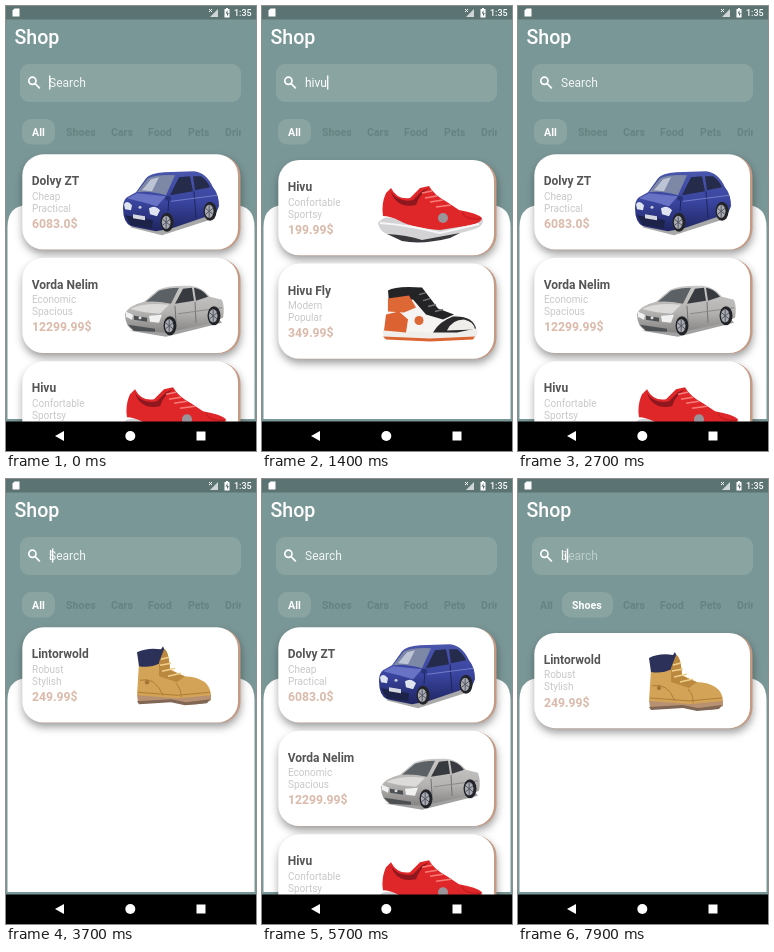
Recreate the animation shown at these times as an HTML page. Size 250 px wide and 445 px high, loop 8 s.

```html
<!DOCTYPE html>
<html lang="en">
<head>
<meta charset="utf-8">
<title>Shop search</title>
<style>
html, body { margin: 0; width: 100%; height: 100%; overflow: hidden; background: #7a9797; }
svg { display: block; width: 100%; height: 100%; }
text { font-family: Roboto, sans-serif; white-space: pre; }
.tab { font-size: 10.6px; font-weight: 700; fill: #648381; }
.name { font-size: 12px; font-weight: 700; fill: #555; }
.note { font-size: 10px; fill: #c8c8c8; }
.price { font-size: 12.2px; font-weight: 700; fill: #dabaab; }
.field { font-size: 12px; fill: #fff; }
.back { fill: #c59a84; filter: drop-shadow(0 4px 4px rgba(0, 0, 0, .4)); }
</style>
</head>
<body>
<svg viewBox="0 0 250 445">
  <defs>
    <clipPath id="listArea"><rect y="140" width="250" height="276"/></clipPath>
    <clipPath id="tabArea"><rect x="14" y="105" width="221" height="40"/></clipPath>
    <linearGradient id="bluePaint" x2="0" y2="1"><stop stop-color="#4a55ac"/><stop offset=".5" stop-color="#3a45a0"/><stop offset="1" stop-color="#1f2560"/></linearGradient>
    <linearGradient id="silverPaint" x2="0" y2="1"><stop stop-color="#c9c8c6"/><stop offset=".55" stop-color="#b5b4b2"/><stop offset="1" stop-color="#858483"/></linearGradient>
    <g id="wheel"><ellipse rx="6.500" ry="9.500" fill="#232428"/><ellipse cx="-.8" rx="4.300" ry="6.500" fill="#a9acb4"/><path d="M-.8 -6V6M-4.500 -3L3 3M-4.500 3L3 -3" stroke="#55585f"/></g>

    <g id="hatchback">
      <path d="M124 73L156 81L209 64L206 56Z" fill="#555" opacity=".5"/>
      <path d="M117 54Q117 46 121 43L130 38L140 24Q144 19 158 18L188 17Q200 18 207 33Q213 40 213 52L210 59L166 74L150 77L125 72Q117 68 117 54Z" fill="url(#bluePaint)"/>
      <path d="M121 44L131 39L160 42L151 52Q134 47 121 44Z" fill="#6873c6"/>
      <path d="M131 38L142 24Q152 20 169 21L160 41Q144 36 131 38Z" fill="#7d87a6"/>
      <path d="M136 36L145 25L153 23L146 37Z" fill="#bcc4d6"/>
      <path d="M164 41L173 23L184 22L187 37ZM189 36L187 22L195 22Q201 26 204 33Z" fill="#252b4a"/>
      <path d="M188 37L190 64M163 43L162 57" fill="none" stroke="#1e265e"/>
      <path d="M165 47L211 41" stroke="#707bc9"/>
      <path d="M118 50Q121 45 126 51L125 56L119 55ZM143 54Q149 50 154 56L151 62L144 60Z" fill="#dfe4f0"/>
      <path d="M119 61L147 66L146 74L125 71Z" fill="#1d2248"/>
      <path d="M127 60L139 62V66L127 64Z" fill="#d5d8e0"/>
      <circle cx="134" cy="53" r="1.500" fill="#c5cad8"/>
      <ellipse cx="162" cy="44" rx="3" ry="2.500" fill="#293378"/>
      <use href="#wheel" x="161" y="68"/><use href="#wheel" x="204" y="57"/>
    </g>

    <g id="sedan">
      <path d="M124 73L160 79L216 65L212 60Z" fill="#444" opacity=".5"/>
      <path d="M119 56Q122 48 138 44L152 32Q163 27 184 28Q196 29 204 39L216 42Q219 50 217 60L202 66L160 75L128 73Q119 69 119 56Z" fill="url(#silverPaint)"/>
      <path d="M124 51Q139 44 163 47L154 56Q136 55 124 51Z" fill="#dcdbd9"/>
      <path d="M140 44L153 33Q162 30 173 30L165 46Q151 43 140 44Z" fill="#5b6165"/>
      <path d="M169 46L177 31L186 30L188 43ZM190 43L188 30Q196 31 202 39Z" fill="#373b3f"/>
      <path d="M189 44L190 65M169 48L170 65" fill="none" stroke="#747474"/>
      <path d="M172 56L216 50" stroke="#8a8a8a"/>
      <path d="M120 54L127 57L126 62L120 59ZM143 58L156 57L153 65L144 64Z" fill="#f1f1f1"/>
      <path d="M128 58L141 60V64L128 62ZM122 67L149 71V74L128 73Z" fill="#4d5052"/>
      <circle cx="134" cy="60" r="1.500" fill="#ddd"/>
      <use href="#wheel" x="164" y="68"/><use href="#wheel" x="208" y="58"/>
    </g>

    <g id="runner">
      <path d="M116 63Q122 53 140 61L178 69L221 59Q222 66 213 69L170 81Q145 83 132 76Q118 74 116 63Z" fill="#d3d3d6"/>
      <path d="M125 74Q145 75 160 80L198 73L188 78Q160 85 140 81Z" fill="#39383c"/>
      <path d="M121 56Q119 44 124 33L129 28Q135 40 148 38L158 28L167 26Q172 35 185 42L197 50Q215 53 220 58Q219 64 203 66L178 70Q151 68 138 61Q128 56 121 56Z" fill="#df2729"/>
      <path d="M129 32Q137 43 151 40L160 31L167 28Q157 35 154 45Q135 49 129 32Z" fill="#8f171d"/>
      <path d="M160 33L170 31M163 38L175 36M168 42L181 40M174 47L189 45" stroke="#f87c78" stroke-width="1.600"/>
      <path d="M200 52Q202 60 219 59" fill="none" stroke="#b8171e"/>
      <path d="M118 63Q147 65 178 73L217 64" fill="none" stroke="#f7f7f8" stroke-width="2"/>
      <circle cx="181" cy="58" r="5" fill="#98959b"/>
    </g>

    <g id="hightop">
      <path d="M121 66L215 65Q217 73 211 75L170 77L124 75Q120 73 121 66Z" fill="#f0eeeb"/>
      <path d="M121 73L168 75L213 73L211 76L168 78L124 76Z" fill="#da6432"/>
      <path d="M123 67L125 47L126 26Q134 22 153 24L161 25L173 44L188 51Q211 52 215 66L170 69Z" fill="#f5f4f2"/>
      <path d="M126 27Q134 22 160 24L176 45L192 51L181 56L164 51L151 36L127 39Z" fill="#242326"/>
      <path d="M126 35L147 32L154 44L142 49L126 48Z" fill="#dd6735"/>
      <path d="M122 67L124 51L137 48L146 56L144 69Z" fill="#dc6231"/>
      <path d="M171 69Q177 58 191 53Q211 52 214 65L195 69Z" fill="#29282b"/>
      <path d="M185 67Q190 56 202 56Q212 58 213 66Z" fill="#efeeea"/>
      <path d="M157 31L164 29M161 37L168 35M166 43L174 41M173 48L181 46" stroke="#777" stroke-width="1.300"/>
      <circle cx="157" cy="57" r="4.500" fill="#dd6735"/>
    </g>

    <g id="boot">
      <path d="M131 67L170 70L205 67V73Q197 78 179 77L166 74L132 75Z" fill="#b89172"/>
      <path d="M131 74L165 72L180 75L204 72L201 76L179 78L165 75L133 77Z" fill="#7f6655"/>
      <path d="M133 36L152 34L157 21Q162 22 164 42L178 49Q204 50 205 68L172 71L131 68Z" fill="#d3a457"/>
      <path d="M131 25Q141 20 155 22L157 19L159 24L154 36Q144 41 133 39Z" fill="#2b3158"/>
      <path d="M153 35L158 22Q163 23 164 43L179 49L171 55L153 49Z" fill="#bb883f"/>
      <path d="M155 32L163 30M154 38L165 36M156 44L169 41M162 49L175 46" stroke="#f0cf8a" stroke-width="1.500"/>
      <path d="M134 53Q149 49 157 68M170 56Q176 63 175 70M132 65L171 68L204 65" fill="none" stroke="#ae7d38"/>
      <circle cx="141" cy="55" r="2.200" fill="#a37635"/>
    </g>
  </defs>

  <rect width="250" height="445" fill="#7a9797"/>
  <rect width="250" height="13.500" fill="#5b7473"/>
  <g fill="#fff">
    <path d="M8.500 2.500H13.500V10.500H6.500V4.500Z"/>
    <path d="M204 11L212 3V11Z" opacity=".7"/>
    <path d="M203 3L206 6M206 3L203 6" stroke="#fff"/>
    <path d="M218.500 3H220V2H222V3H223.500V11.500H218.500Z"/>
    <path d="M221.500 4L219.500 7.500H221V10.500L223 7H221.500Z" fill="#5b7473"/>
    <text x="228" y="10" font-size="9" font-weight="500">1:35</text>
    <text x="8.500" y="37.500" font-size="19.600" font-weight="500">Shop</text>
  </g>

  <rect x="14" y="58" width="221" height="38" rx="9" fill="#8aa5a1"/>
  <g fill="none" stroke="#fff" stroke-width="1.700"><circle cx="26.400" cy="74.800" r="3.600"/><path d="M29 77.500L33.800 82.300"/></g>
  <text id="hint" class="field" x="43" y="80.700">Search</text>
  <text id="typed" class="field" x="43" y="80.700"></text>
  <rect id="caret" y="69.500" width="1.400" height="14" fill="#fff"/>

  <g clip-path="url(#tabArea)">
    <rect id="pillAll" x="16" y="113" height="25.500" rx="9" fill="#8aa5a1"/>
    <rect id="pillShoes" y="113" height="25.500" rx="9" fill="#8aa5a1"/>
    <text id="tabAll" class="tab" y="130">All</text>
    <text id="tabShoes" class="tab" y="130">Shoes</text>
    <text class="tab" x="105" y="130">Cars</text>
    <text class="tab" x="142" y="130">Food</text>
    <text class="tab" x="182" y="130">Pets</text>
    <text class="tab" x="219" y="130">Drinks</text>
  </g>

  <path d="M1.500 413V221Q1.500 199 23 199H227Q248.500 199 248.500 221V413Z" fill="#fff"/>
  <g id="cards" clip-path="url(#listArea)"></g>

  <rect y="415.500" width="250" height="29.500" fill="#000"/>
  <g fill="#fff"><path d="M49 430L58 425V435Z"/><circle cx="124.300" cy="430" r="5"/><rect x="190.500" y="425.500" width="9" height="9"/></g>
</svg>

<script>
const LOOP = 8000, CARD_STEP = 103.5;
const $ = id => document.getElementById(id);

const products = {
  hatchback: ['Dolvy ZT', 'Cheap', 'Practical', '6083.0$'],
  sedan: ['Vorda Nelim', 'Economic', 'Spacious', '12299.99$'],
  runner: ['Hivu', 'Confortable', 'Sportsy', '199.99$'],
  hightop: ['Hivu Fly', 'Modern', 'Popular', '349.99$'],
  boot: ['Lintorwold', 'Robust', 'Stylish', '249.99$']
};
const lists = {
  all: ['hatchback', 'sedan', 'runner'],
  shoes: ['runner', 'hightop', 'boot'],
  hivu: ['runner', 'hightop'],
  boot: ['boot']
};
const restY = { 1: 164, 2: 154, 3: 148.3 };

// start time, search text, visible list
const steps = [
  [0, '', 'all'], [400, 'h', 'hivu'], [600, 'hi', 'hivu'], [900, 'hiv', 'hivu'], [1200, 'hivu', 'hivu'],
  [1700, 'hiv', 'hivu'], [1900, 'hi', 'hivu'], [2100, 'h', 'hivu'], [2200, '', 'all'],
  [3700, 'l', 'boot'], [4000, 'li', 'boot'], [4800, 'l', 'boot'], [5000, '', 'all'],
  [6200, '', 'shoes'], [7800, 'l', 'boot'], [7890, 'li', 'boot']
];
const caretOff = [[2450, 2890], [3290, 3690], [5690, 6190], [6590, 7090], [7390, 7790]];

const cards = {};
for (const [id, [name, line1, line2, price]] of Object.entries(products)) {
  const card = document.createElementNS('http://www.w3.org/2000/svg', 'g');
  card.innerHTML = `
    <rect class="back" x="17" y="1" width="217.500" height="94.500" rx="21"/>
    <rect x="16.300" width="215.700" height="95.300" rx="21" fill="#fff"/>
    <text class="name" x="25.700" y="31">${name}</text>
    <text class="note" x="26" y="45.500">${line1}</text>
    <text class="note" x="26" y="57.500">${line2}</text>
    <text class="price" x="26" y="73.700">${price}</text>
    <use href="#${id}"/>`;
  cards[id] = $('cards').appendChild(card);
}

const set = (id, attrs) => {
  for (const key in attrs) $(id).setAttribute(key, attrs[key]);
};
const mix = (a, b, p) => a + (b - a) * p;
const smooth = (t, start, length) => {
  const p = Math.min(1, Math.max(0, (t - start) / length));
  return p * p * (3 - 2 * p);
};
const tabFill = on => `rgb(${mix(100, 255, on)},${mix(131, 255, on)},${mix(129, 255, on)})`;

// Follows a value through the steps, easing after each change.
function follow(t, valueOf, length) {
  let value = valueOf(steps[0]), last = value;
  for (const step of steps) {
    if (step[0] > t) break;
    const next = valueOf(step);
    if (next !== last) value = mix(value, next, smooth(t, step[0], length));
    last = next;
  }
  return value;
}

function draw(t) {
  const [, query, listName] = steps.filter(step => step[0] <= t).pop();
  const list = lists[listName];
  const top = follow(t, step => restY[lists[step[2]].length], 250);

  for (const id in cards) {
    const row = list.indexOf(id);
    cards[id].style.display = row < 0 ? 'none' : '';
    cards[id].setAttribute('transform', `translate(0 ${top + row * CARD_STEP})`);
  }

  $('typed').textContent = query;
  set('hint', { opacity: .88 * follow(t, step => step[1] ? 0 : 1, 200) });
  set('caret', {
    x: 43 + (query ? $('typed').getComputedTextLength() : 0),
    opacity: caretOff.some(([from, to]) => t >= from && t < to) ? 0 : 1
  });

  const p = smooth(t, 6180, 220);
  set('pillAll', { width: mix(33, 25, p), opacity: 1 - p });
  set('pillShoes', { x: mix(54, 44, p), width: mix(41, 51, p), opacity: p });
  set('tabAll', { x: mix(26, 22, p), style: `fill:${tabFill(1 - p)}` });
  set('tabShoes', { x: mix(60, 54, p), style: `fill:${tabFill(p)}` });
}

const began = performance.now();
function tick() {
  draw((performance.now() - began) % LOOP);
  requestAnimationFrame(tick);
}
tick();
</script>
</body>
</html>
```
